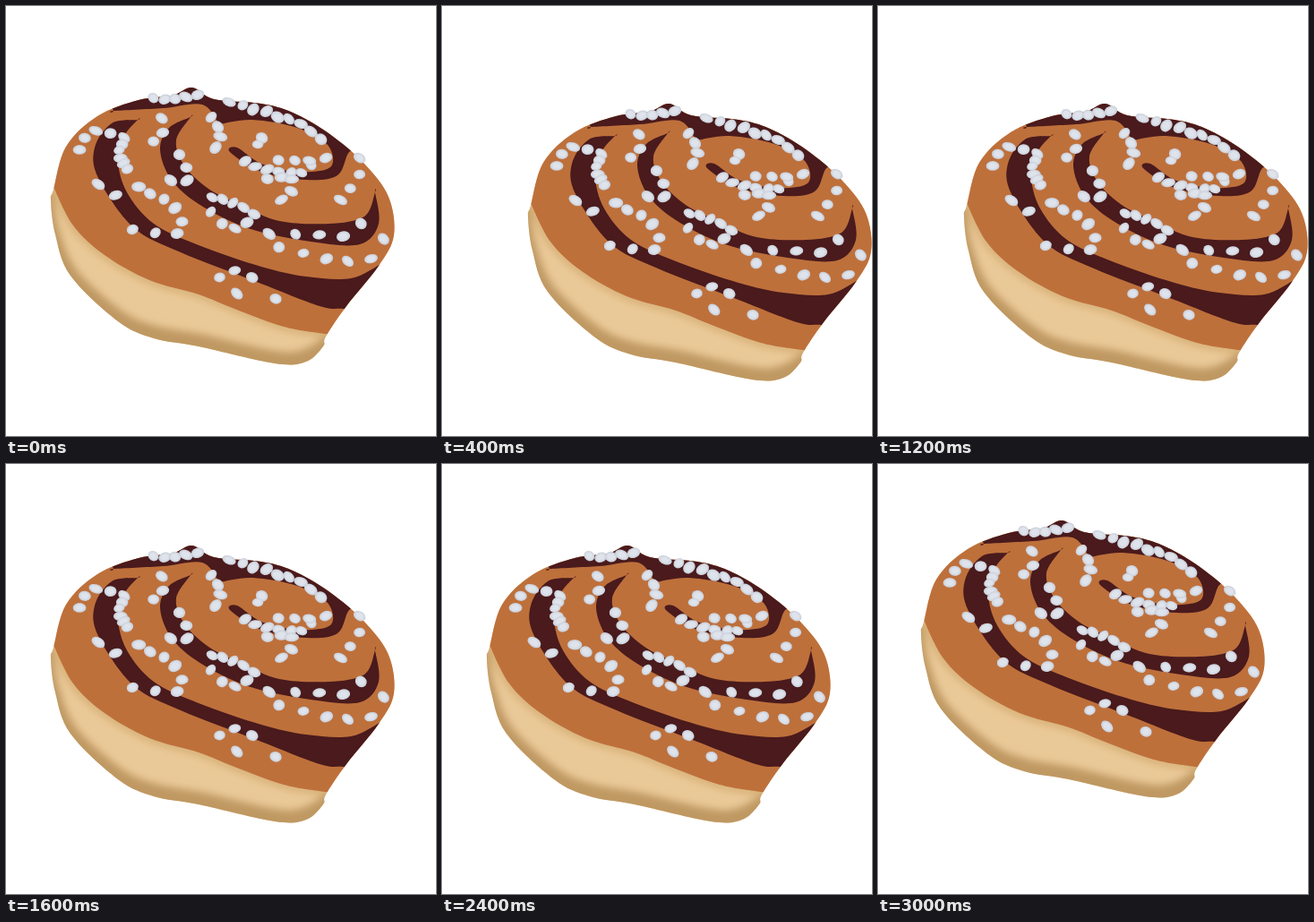
Recreate the animation shown at these times as an HTML page. Size 480x480 px, loop 3.2 s.

```html
<!DOCTYPE html>
<html lang="en">
<head>
<meta charset="utf-8">
<title>Cinnamon bun</title>
<style>
  html, body { margin: 0; width: 100%; height: 100%; overflow: hidden; background: #fff; }
  svg { display: block; width: 480px; height: 480px; }
  #bun { animation: hop 800ms step-end infinite; }
  @keyframes hop {
    0% { transform: translate(0, 0); }
    25% { transform: translate(-25px, 46px); }
    50% { transform: translate(46px, 18px); }
    75%, 100% { transform: translate(-2px, -28px); }
  }
</style>
</head>
<body>
<svg viewBox="0 0 480 480">
  <defs>
    <clipPath id="body"><path id="edge"/></clipPath>
    <filter id="soft" x="-20%" y="-20%" width="140%" height="140%"><feGaussianBlur stdDeviation="4"/></filter>
    <radialGradient id="sugar">
      <stop offset=".5" stop-color="#dfe4ec"/>
      <stop offset="1" stop-color="#c9ced9"/>
    </radialGradient>
  </defs>
  <g id="bun">
    <g clip-path="url(#body)">
      <rect width="480" height="480" fill="#eac998"/>
      <g fill="none" stroke-linecap="round" filter="url(#soft)">
        <path id="shade" stroke="#bf9862" stroke-width="30"/>
        <path id="crease" stroke="#d5ad73" stroke-width="8"/>
      </g>
      <path id="glaze" fill="#be703b"/>
      <g id="swirls" fill="#4a1a1c"></g>
    </g>
    <g id="pearls" fill="url(#sugar)"></g>
  </g>
</svg>
<script>
const NS = 'http://www.w3.org/2000/svg';
const $ = id => document.getElementById(id);

function add(parent, tag, attrs) {
  const el = document.createElementNS(NS, tag);
  for (const key in attrs) el.setAttribute(key, attrs[key]);
  return parent.appendChild(el);
}

// Smooth curve through key points; a doubled point makes a corner.
function curve(text, closed = true) {
  const pts = text.trim().split(/\s+/).map(p => p.split(',').map(Number));
  const n = pts.length;
  const at = i => pts[closed ? (i + n) % n : Math.min(Math.max(i, 0), n - 1)];
  let d = 'M' + pts[0];
  for (let i = 0; i < (closed ? n : n - 1); i++) {
    const [a, b, c, e] = [at(i - 1), at(i), at(i + 1), at(i + 2)];
    const out = b.map((v, k) => v + (c[k] - a[k]) / 6);
    const into = c.map((v, k) => v - (e[k] - b[k]) / 6);
    d += `C${out} ${into} ${c}`;
  }
  return d + (closed ? 'Z' : '');
}

let seed = 11;
const random = () => (seed = seed * 16807 % 2147483647) / 2147483647;
const spread = size => (random() * 2 - 1) * size;

$('edge').setAttribute('d', curve(`53,205 67,157 102,123 148,105 185,100 208,91 232,104 285,109
  320,119 360,142 400,176 427,213 433,256 416,290 380,335 357,369
  354,380 335,397 300,399 215,380 165,371 125,352 72,301 55,255 50,217`));
$('shade').setAttribute('d', curve('368,380 336,398 300,400 215,381 165,372 123,354 67,304 45,255 38,217', false));

const rim = '52,200 75,245 110,278 160,306 215,322 255,338 310,358 356,366';
$('crease').setAttribute('d', curve(rim, false));
$('glaze').setAttribute('d', curve(rim, false) + 'L450,372V60H30V200Z');

const swirls = [
  // back fold and centre hook
  `120,117 120,117 175,114 219,110 238,132 238,132 275,127 325,136 359,155 362,180 325,185 285,176
   258,158 250,163 285,185 335,194 370,189 383,163 400,158 370,130 300,90 210,75 120,95`,
  // middle turn
  `206,124 206,124 182,136 172,160 184,193 215,221 270,248 340,263 395,266 416,243 412,208 412,208
   400,235 360,243 305,240 264,223 226,204 199,178 190,150`,
  // outer turn
  `147,127 147,127 118,131 99,158 103,192 142,247 195,275 280,308 350,335 377,338 400,340 425,300 420,287
   420,287 385,304 335,302 285,291 215,267 165,243 135,208 125,172 132,145`
];
for (const s of swirls) add($('swirls'), 'path', { d: curve(s) });

// Sugar pearls strung evenly along short trails, each nudged and turned a little.
const trails = [
  [5, '165,104 190,104 214,100'], [9, '250,107 295,120 332,135 350,149'],
  [4, '396,171 395,187 384,205 372,215'], [4, '81,160 95,139 117,141'],
  [6, '133,146 127,166 135,182'], [3, '175,125 176,140 165,152'],
  [2, '104,198 123,212'], [5, '148,202 167,211 183,220 195,240'],
  [3, '141,248 171,253 190,254'], [4, '193,167 204,194 185,194'],
  [4, '229,125 238,142 235,157'], [2, '285,146 281,156'],
  [7, '267,174 291,181 327,186 341,177'], [4, '303,171 331,172 357,169'],
  [5, '293,193 318,192 320,204 308,215'], [5, '229,215 258,221 276,231'],
  [4, '230,231 250,249 268,242'], [5, '295,255 336,254 369,260 397,242'],
  [6, '306,269 337,277 380,284 408,282 421,259'],
  [3, '239,304 249,293 276,302'], [2, '259,321 300,326']
];
for (const [count, points] of trails) {
  const trail = add($('pearls'), 'path', { d: curve(points, false), fill: 'none' });
  const gap = trail.getTotalLength() / (count - 1);
  for (let i = 0; i < count; i++) {
    const { x, y } = trail.getPointAtLength(i * gap);
    add($('pearls'), 'ellipse', {
      rx: 7.3 + spread(1), ry: 5.5 + spread(.7),
      transform: `translate(${x + spread(1.5)} ${y + spread(1.5)}) rotate(${spread(50)})`
    });
  }
  trail.remove();
}
</script>
</body>
</html>
```
